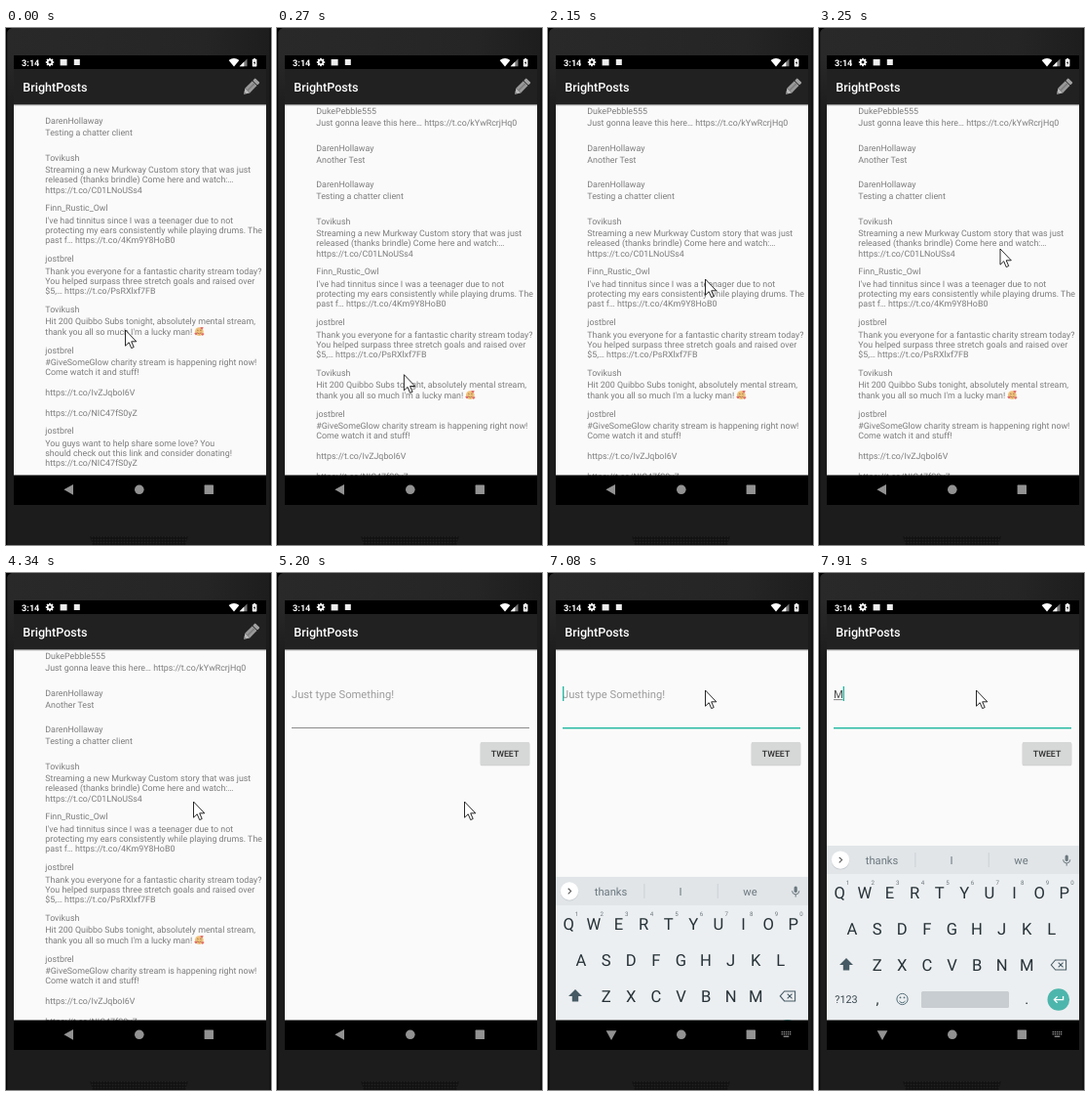
An HTML page that plays this animation: 272 px wide and 529 px high, repeating every 8 s.

```html
<!DOCTYPE html>
<html lang="en">
<head>
<meta charset="utf-8">
<title>Phone app</title>
<style>
html, body { margin: 0; width: 100%; height: 100%; overflow: hidden; background: #1b1b1b; }
svg { display: block; width: 100vw; height: 100vh; }
text { font-family: Roboto, sans-serif; text-rendering: geometricPrecision; white-space: pre; }
.feed { font-size: 8.85px; fill: #7c7c7c; }
.mid { text-anchor: middle; }
</style>
</head>
<body>
<svg id="stage" viewBox="0 0 272 529" xmlns="http://www.w3.org/2000/svg"></svg>
<script>
const LOOP = 8000;
const TEAL = '#1fb7a0';
const BAR_END = 78.4, NAV_TOP = 457.5;

// ---------- markup helpers ----------
const rect = (x, y, w, h, fill, more = '') =>
  `<rect x="${x}" y="${y}" width="${w}" height="${h}" fill="${fill}" ${more}/>`;
const circle = (x, y, r, fill, more = '') =>
  `<circle cx="${x}" cy="${y}" r="${r}" fill="${fill}" ${more}/>`;
const path = (d, fill, more = '') => `<path d="${d}" fill="${fill}" ${more}/>`;
const stroke = (d, color, width, more = '') =>
  path(d, 'none', `stroke="${color}" stroke-width="${width}" ${more}`);
const text = (x, y, str, size, fill, more = '') =>
  `<text x="${x}" y="${y}" font-size="${size}" fill="${fill}" ${more}>${str}</text>`;
const mid = (x, y, str, size, fill, more = '') => text(x, y, str, size, fill, `class="mid" ${more}`);

// ---------- feed ----------
const posts = [
  ['DukePebble555', 'Just gonna leave this here… https://t.co/kYwRcrjHq0'],
  ['DarenHollaway', 'Another Test'],
  ['DarenHollaway', 'Testing a chatter client'],
  ['Tovikush', 'Streaming a new Murkway Custom story that was just',
    'released (thanks brindle) Come here and watch:…', 'https://t.co/C01LNoUSs4'],
  ['Finn_Rustic_Owl', 'I\'ve had tinnitus since I was a teenager due to not',
    'protecting my ears consistently while playing drums. The', 'past f… https://t.co/4Km9Y8HoB0'],
  ['jostbrel', 'Thank you everyone for a fantastic charity stream today?',
    'You helped surpass three stretch goals and raised over', '$5,… https://t.co/PsRXlxf7FB'],
  ['Tovikush', 'Hit 200 Quibbo Subs tonight, absolutely mental stream,',
    'thank you all so much I\'m a lucky man!'],
  ['jostbrel', '#GiveSomeGlow charity stream is happening right now!', 'Come watch it and stuff!',
    '', 'https://t.co/IvZJqboI6V', '', 'https://t.co/NIC47fS0yZ'],
  ['jostbrel', 'You guys want to help share some love? You',
    'should check out this link and consider donating!', 'https://t.co/NIC47fS0yZ'],
];

function smiley(x, y) {
  const heart = (a, b) => path(`M${x + a} ${y + b + 1.6}l-1.6-1.7q0-1.4 1.6-.7q1.6-.7 1.6.7z`, '#e06a6a');
  return circle(x, y, 4.4, '#efc27c')
    + stroke(`M${x - 2} ${y + 1}q2 2.6 4 0M${x - 2.3} ${y - 1}q.8-1 1.6 0M${x + .7} ${y - 1}q.8-1 1.6 0`, '#8f6340', .7)
    + heart(-3.3, 2.2) + heart(3.5, 2.6) + heart(2.7, -3.6);
}

function feed() {
  let y = 88, out = '';
  for (const [name, ...lines] of posts) {
    out += `<text class="feed" x="40.3" y="${y}">${name}</text>`;
    lines.forEach((line, i) => {
      const ly = y + 12.3 + i * 10.35;
      out += `<text class="feed" x="40.3" y="${ly}">${line}</text>`;
      if (line.endsWith('man!')) out += smiley(198.3, ly - 3);
    });
    y += Math.max(37.5, 20.8 + 10.35 * lines.length);
  }
  return out;
}

// ---------- screens ----------
const appBar = () => rect(8, BAR_END, 259, 2, 'url(#shade)') + rect(8, 42, 259, BAR_END - 42, '#212121')
  + text(17.3, 65.2, 'BrightPosts', 12.6, '#fff', 'font-weight="500"');

const pencil = () => `<g transform="translate(244 67.8) rotate(-45)">`
  + path('M0 0l5.4-3.4v6.8z', '#b9b9b9') + path('M0 0l2.2-1.4v2.8z', '#777')
  + rect(5.4, -3.4, 10.4, 6.8, '#999') + rect(5.4, -.8, 10.4, 1.6, '#7d7d7d')
  + rect(16.5, -3.4, 3.5, 6.8, '#a2a2a2', 'rx="1"') + '</g>';

const compose = () => rect(8, 42, 259, 416, '#fafafa') + appBar()
  + text(15, 128, 'Just type Something!', 11.2, '#9c9c9c', 'id="hint"')
  + `<g id="typed">${text(15, 128, 'M', 11.3, '#4c4c4c')}${rect(15, 129.3, 9.6, .8, '#666')}</g>`
  + rect(15, 158, 244, 1, '#8c8c8c', 'id="line"')
  + rect(15, 116, 1.3, 15, TEAL, 'id="caret"')
  + rect(208.6, 174, 50.8, 23.2, '#000', 'rx="1.5" opacity=".16"')
  + rect(208.8, 173, 50.4, 23, '#d6d7d7', 'rx="1.3"')
  + mid(234, 187.6, 'TWEET', 8.8, '#2b2b2b', 'font-weight="500"');

function keyboard() {
  const ink = '#263238', soft = '#6b787f';
  let out = rect(8, 279, 259, 179, '#eceff1') + rect(8, 279, 259, 29, '#e1e5e8')
    + circle(22, 294.3, 9.3, '#c5cbcf') + circle(22, 293.6, 9.2, '#fff')
    + stroke('M20.7 290.8l2.9 2.8l-2.9 2.8', '#555', 1.1)
    + mid(64.5, 297.6, 'thanks', 11.2, soft) + mid(136, 297.6, 'I', 11.2, soft) + mid(207.5, 297.6, 'we', 11.2, soft)
    + rect(98.5, 286, .8, 15, '#c6ccd0') + rect(173.8, 286, .8, 15, '#c6ccd0')
    + rect(252.6, 288.5, 3.2, 6.6, soft, 'rx="1.6"')
    + stroke('M250.6 293.3q0 3.6 3.6 3.6t3.6-3.6M254.2 297v2.6', soft, 1);
  const rows = [['QWERTYUIOP', 21.3, 333], ['ASDFGHJKL', 34, 370], ['ZXCVBNM', 59.7, 406.8]];
  rows.forEach(([keys, x0, y], r) => [...keys].forEach((key, i) => {
    const x = x0 + i * 25.6;
    out += mid(x, y, key, 16.6, ink);
    if (!r) out += mid(x + 8.3, 319.3, (i + 1) % 10, 6.2, soft);
  }));
  return out
    + path('M28 394l7 7h-3.8v5.6h-6.4v-5.6h-3.8z', '#455a64')
    + stroke('M238.3 401l4.3-5h11v10h-11zM245.7 398.6l4.8 4.8m0-4.8l-4.8 4.8', '#455a64', 1.1)
    + mid(28, 440, '?123', 10.8, '#37474f') + mid(60, 440.5, ',', 15, ink) + mid(213.3, 440.5, '.', 15, ink)
    + stroke('M82.4 438q3.1 3.4 6.2 0', '#546e7a', 1) + circle(85.5, 436, 5.6, 'none', 'stroke="#546e7a"')
    + circle(83.5, 434.4, .9, '#546e7a') + circle(87.5, 434.4, .9, '#546e7a')
    + rect(105, 428, 90, 17, '#c8cdd1', 'rx="1.5"')
    + circle(245.8, 436.5, 11.3, '#4db6ac')
    + stroke('M250.6 433v3.6h-9M244.6 433.4l-3.2 3.2l3.2 3.2', '#fff', 1.3);
}

// ---------- device ----------
function statusBar() {
  let gear = circle(45, 35, 2.3, 'none', 'stroke="#fff" stroke-width="1.7"');
  for (let a = 0; a < 360; a += 45) gear += rect(44.2, 30.8, 1.6, 1.6, '#fff', `transform="rotate(${a} 45 35)"`);
  return rect(8, 28, 259, 14, '#000')
    + text(16.1, 38.5, '3:14', 9.1, '#fff', 'font-weight="600"') + gear
    + rect(55.6, 32, 7, 6.4, '#eee') + rect(69.8, 32, 6, 6, '#eee')
    + path('M228.6 33q5.4-4 10.8 0l-5.4 6.4z', '#fff')
    + path('M247.5 31.4v7.8h-7.8z', '#777') + path('M244.4 34.5v4.7h-4.7z', '#fff')
    + rect(252.8, 32, 4.6, 7.4, '#fff', 'rx=".6"') + rect(254.1, 31, 2, 1.4, '#fff')
    + path('M255.5 33.2l-1.5 2.8h1l-.4 2.2l1.6-2.9h-1z', '#000');
}

function navBar() {
  const grey = '#929292';
  let keys = '';
  for (let r = 0; r < 2; r++) for (let i = 0; i < 5; i++) keys += rect(239.6 + i * 2.1, 469 + r * 2.2, 1.3, 1.3, grey);
  return rect(8, NAV_TOP, 259, 488 - NAV_TOP, '#000')
    + path('M59.4 472.3l9.6-5.4v10.8z', grey, 'id="back"')
    + circle(136.8, 472.3, 4.8, grey) + rect(203.6, 467.6, 9.4, 9.4, grey, 'rx=".6"')
    + `<g id="keys">${keys}${rect(241.7, 473.6, 5.6, 1.3, grey)}</g>`;
}

const frame = () => rect(0, 0, 272, 529, '#1c1c1c') + rect(0, 0, 272, 28, 'url(#top)')
  + rect(0, 28, 8, 60, 'url(#side)')
  + rect(0, 0, 1.2, 529, '#050505') + rect(270.6, 0, 1.4, 529, '#101010')
  + path('M0 0h6q-5 1-6 8z', '#000')
  + path('M86 520h101l-3 9h-95z', '#121212') + path('M86 520h101l-3 9h-95z', 'url(#mesh)');

document.getElementById('stage').innerHTML = `<defs>
  <clipPath id="body"><rect x="8" y="78" width="259" height="380"/></clipPath>
  <clipPath id="app"><rect x="8" y="42" width="259" height="416"/></clipPath>
  <linearGradient id="shade" x2="0" y2="1"><stop stop-color="#000" stop-opacity=".25"/><stop offset="1" stop-color="#000" stop-opacity="0"/></linearGradient>
  <linearGradient id="top"><stop stop-color="#292929"/><stop offset=".75" stop-color="#252525"/><stop offset="1" stop-color="#1d1d1d"/></linearGradient>
  <linearGradient id="side" x2="0" y2="1"><stop stop-color="#292929"/><stop offset="1" stop-color="#1c1c1c"/></linearGradient>
  <pattern id="mesh" width="3" height="3" patternUnits="userSpaceOnUse"><circle cx="1.5" cy="1.5" r=".8" fill="#222"/></pattern>
  </defs>`
  + frame() + rect(8, 28, 259, 460, '#fafafa')
  + `<g clip-path="url(#body)"><g id="feed">${feed()}</g></g>` + appBar()
  + circle(251.5, 60, 12.5, '#fff', 'id="ripple"') + pencil()
  + `<g clip-path="url(#app)"><g id="compose">${compose()}</g></g>`
  + `<g clip-path="url(#body)"><g id="board">${keyboard()}</g></g>`
  + statusBar() + navBar()
  + path('M0 0v16.2l3.7-3.5l2.5 5.9l2.5-1.1l-2.5-5.7h5.1z', '#fff', 'id="mouse" stroke="#111" stroke-width=".9"');

// ---------- motion ----------
// Bursts of screen updates: start, end, count
const bursts = [[150, 820, 6], [1090, 2000, 8], [2150, 3130, 8], [3250, 3640, 4], [3920, 4340, 4],
  [4900, 5740, 7], [6020, 6160, 2], [6440, 6590, 2], [6960, 7210, 3], [7480, 7480, 1], [7910, 7910, 1]];
const ticks = [0];
for (const [a, b, n] of bursts)
  for (let i = 0; i < n; i++) ticks.push(i === 0 ? a : i === n - 1 ? b : a + (b - a) * i / (n - 1) - 14);

const route = [[0, 122.5, 309], [150, 127, 336], [270, 130.4, 354.7], [820, 130, 378], [1090, 100, 320],
  [1350, 46, 170], [1480, 62, 94], [1740, 195, 150], [2000, 169, 266], [2150, 161.5, 257],
  [2420, 106, 180], [2560, 118, 126], [2850, 168, 160], [3130, 168, 262], [3250, 186, 226],
  [3510, 240, 86], [3640, 248, 61], [3920, 244, 74], [4340, 192.5, 234], [5200, 192.5, 234], [5740, 161.5, 120]];

function along(stops, t) {
  let i = stops.findIndex(s => s[0] > t);
  if (i < 0) return stops[stops.length - 1].slice(1);
  if (i === 0) return stops[0].slice(1);
  const a = stops[i - 1], b = stops[i], k = (t - a[0]) / (b[0] - a[0]);
  return a.slice(1).map((v, j) => v + (b[j + 1] - v) * k);
}
const ramp = (t, a, b) => Math.min(1, Math.max(0, (t - a) / (b - a)));
const within = (t, a, b) => t >= a && t < b;
const set = (id, attrs) => {
  const el = document.getElementById(id);
  for (const key in attrs) el.setAttribute(key, attrs[key]);
};
const show = (id, on) => { document.getElementById(id).style.display = on ? '' : 'none'; };

function draw(ms) {
  const t = ticks.filter(v => v <= ms).pop();
  const [mx, my] = along(route, t);
  set('mouse', { transform: `translate(${mx} ${my})` });

  const scroll = along([[0, 65], [150, 20], [270, 0]], t)[0];
  set('feed', { transform: `translate(0 ${-scroll})` });
  set('ripple', { opacity: within(t, 3920, 4340) ? .16 * (1 - ramp(t, 3920, 4300)) : 0 });

  const open = ramp(t, 4800, 5120);
  show('compose', t >= 4900);
  set('compose', { opacity: Math.min(1, open * 2), transform: `translate(0 ${30 * (1 - open) ** 2})` });

  const focused = t >= 6020, typing = t >= 7910;
  set('line', { fill: focused ? TEAL : '#8c8c8c', height: focused ? 1.4 : 1, opacity: t === 6020 ? .6 : 1 });
  show('hint', !typing);
  show('typed', typing);
  show('caret', within(t, 6020, 6590) || within(t, 6960, 7480) || typing);
  set('caret', { x: typing ? 24.7 : 15 });

  set('back', { transform: `rotate(${-90 * ramp(t, 6290, 6590)} 65 472.3)` });
  set('keys', { opacity: ramp(t, 6290, 6590) });

  show('board', t >= 6960);
  set('board', { transform: `translate(0 ${180 * (1 - ramp(t, 6880, 7210)) ** 2})` });
}

const start = performance.now();
function tick() {
  draw((performance.now() - start) % LOOP);
  requestAnimationFrame(tick);
}
tick();
</script>
</body>
</html>
```
